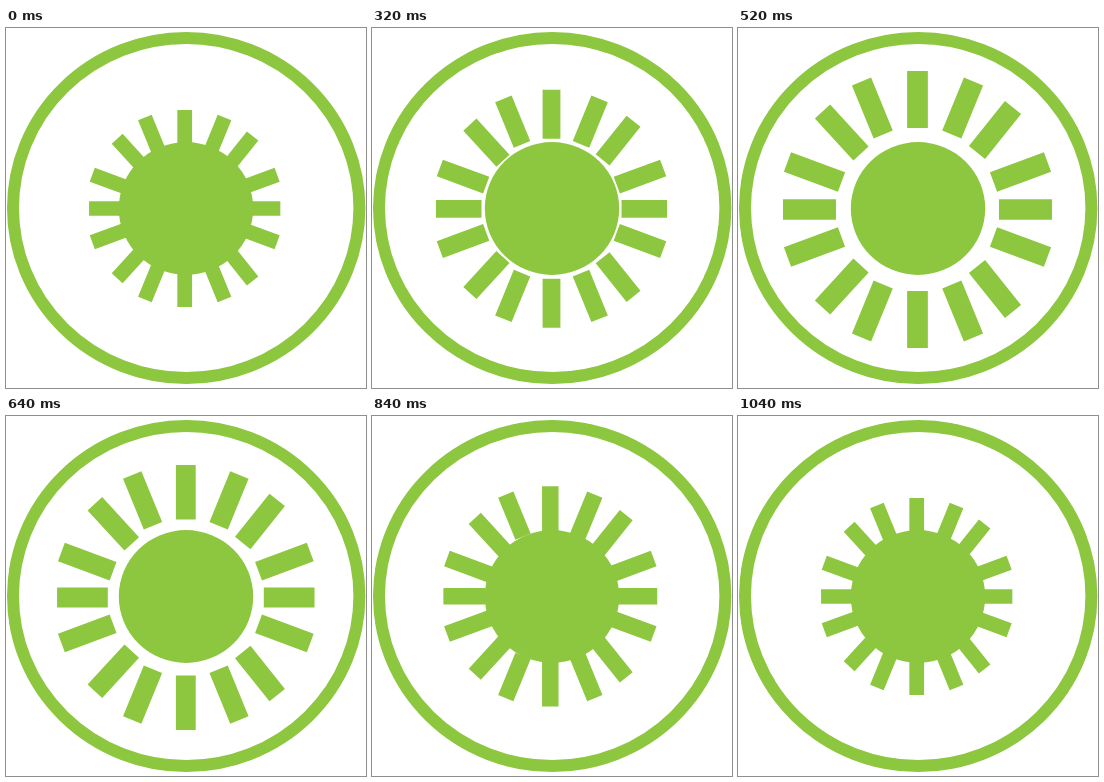
These frames come from a looping animation (360 px wide and 360 px high, 1160 ms). An HTML page:

```html
<!DOCTYPE html>
<html lang="en">
<head>
<meta charset="utf-8">
<title>Pulsing sun</title>
<style>
  html, body { margin: 0; width: 100%; height: 100%; overflow: hidden; background: #fff; }
  svg { display: block; width: 100vw; height: 100vh; }
</style>
</head>
<body>
<svg viewBox="0 0 360 360">
  <ellipse cx="180.2" cy="180" rx="173.2" ry="170" fill="none" stroke="#8dc63f" stroke-width="12"/>
  <path id="rays" fill="none" stroke="#8dc63f" stroke-width="20.7"/>
  <ellipse cx="180" cy="180.5" rx="67.2" ry="66.4" fill="#8dc63f"/>
</svg>
<script>
const rays = document.getElementById('rays');
const LOOP = 1160;

// Rays at full size, relative to the centre: inner x, y, outer x, y
const mirrored = [
  [76, 27.5, 130, 47.5],
  [34.3, 75, 56, 128],
];
const single = [
  [81.5, 0, 134.5, 0], [-81.5, 0, -134.5, 0],
  [0, 81.5, 0, 138.5], [0, -81.5, 0, -138.5],
  [59.5, 57, 95.5, 102], [59.5, -57, 95.5, -102],
  [-56.5, 56, -95, 98], [-56.5, -56, -95, -98],
];
const flip = ([a, b, c, d], sx, sy) => [a * sx, b * sy, c * sx, d * sy];
const all = single.concat(mirrored.flatMap(r =>
  [[1, 1], [-1, 1], [1, -1], [-1, -1]].map(([sx, sy]) => flip(r, sx, sy))));
rays.setAttribute('d', all.map(([a, b, c, d]) => `M${a} ${b}L${c} ${d}`).join(''));

// Poses from drawn in to spread out: scale, centre x, centre y
const poses = [
  [0.711, 178.7, 180.5],
  [0.754, 178.6, 180.4],
  [0.795, 178.3, 180.3],
  [0.859, 179.5, 180.8],
  [0.911, 179.7, 181.2],
  [0.957, 179.8, 181.5],
  [1, 179.5, 181.5],
];

// Hold times; the way back mirrors the way out
const holds = [120, 80, 120, 40, 80, 80];
const starts = holds.reduce((list, hold) => [...list, list.at(-1) + hold], [0]);

function draw(time) {
  const t = time % LOOP;
  const back = t >= LOOP / 2;
  const index = back
    ? starts.findLastIndex(s => s <= LOOP - t - 1e-6)
    : starts.findLastIndex(s => s <= t);
  const [scale, x, y] = poses[index];
  rays.setAttribute('transform', `translate(${x} ${y}) scale(${scale})`);
}

const begin = performance.now();
function tick() {
  draw(performance.now() - begin);
  requestAnimationFrame(tick);
}
draw(0);
requestAnimationFrame(tick);
</script>
</body>
</html>
```
